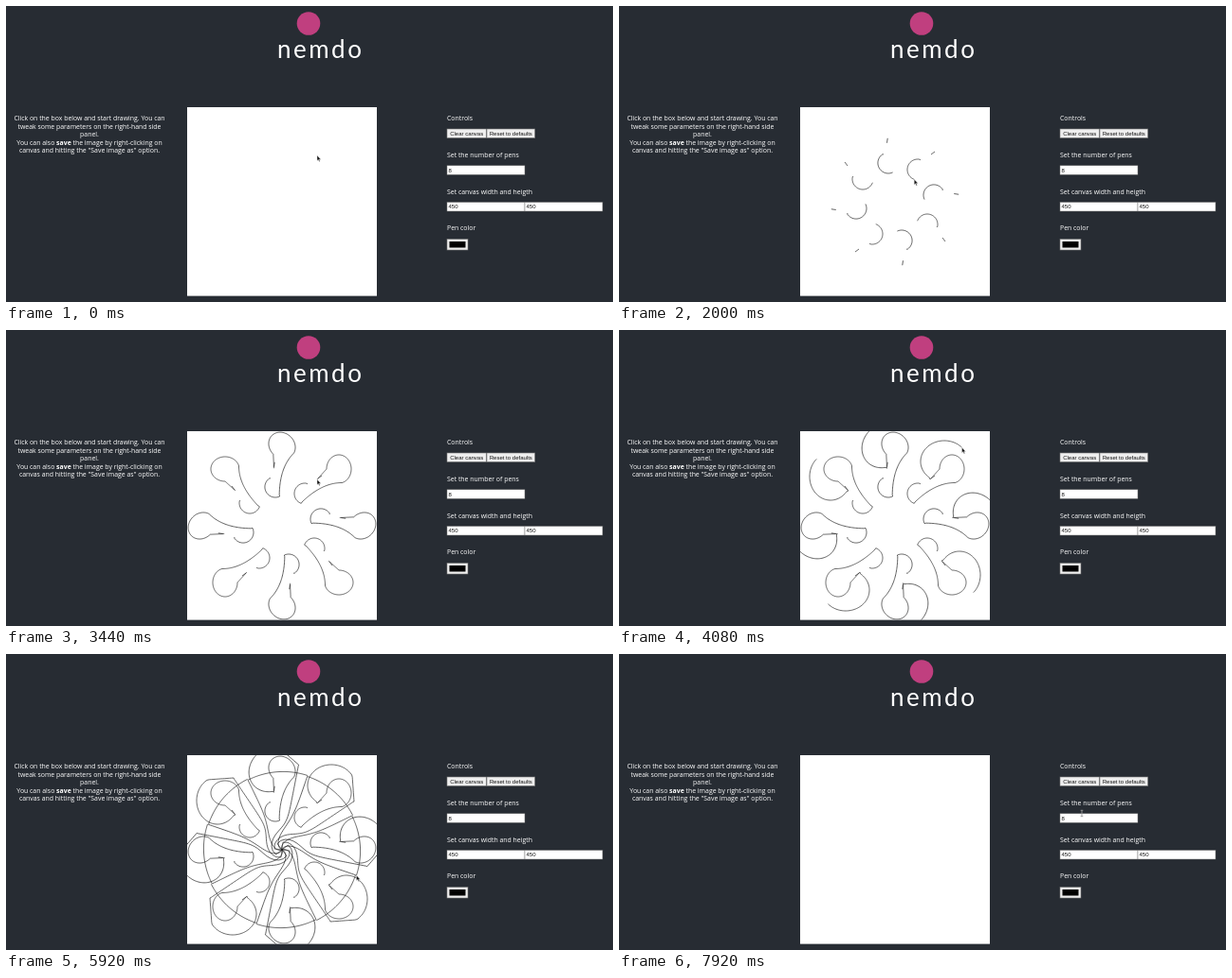
Animation of 640 by 313 pixels, one loop 8000 ms. Source, as an HTML page:

```html
<!DOCTYPE html>
<html lang="en">
<head>
<meta charset="utf-8">
<title>Mandala pens</title>
<style>
  html, body { margin: 0; height: 100%; overflow: hidden; background: #272c33; }
  svg { display: block; width: 100vw; height: 100vh; }
  .copy { font: 6.92px "Open Sans", sans-serif; fill: #fff; }
  .form { font: 6px "Liberation Sans", sans-serif; fill: #111; }
  .mid { text-anchor: middle; }
  .title { font: 26px Lato, sans-serif; letter-spacing: 2.5px; fill: #fff; }
  .box { fill: #fff; stroke: #767676; stroke-width: .5; }
  .btn { fill: #efefef; stroke: #767676; stroke-width: .6; }
  .ink { fill: none; stroke: #1a1a1a; stroke-width: .65; }
</style>
</head>
<body>
<svg viewBox="0 0 640 313">
  <defs>
    <path id="ink" class="ink"/>
    <clipPath id="sheet"><rect x="191" y="107" width="200" height="199.6"/></clipPath>
  </defs>

  <circle cx="319" cy="18.5" r="12.3" fill="#c03f7f"/>
  <text class="title" x="286" y="55">nemdo</text>

  <g class="copy mid">
    <text x="88" y="121">Click on the box below and start drawing. You can</text>
    <text x="88" y="129.6">tweak some parameters on the right-hand side</text>
    <text x="88" y="138.1">panel.</text>
    <text x="88" y="146.6">You can also <tspan font-weight="700">save</tspan> the image by right-clicking on</text>
    <text x="88" y="155.1">canvas and hitting the "Save image as" option.</text>
  </g>

  <g class="copy">
    <text x="465" y="121">Controls</text>
    <text x="465" y="159.7">Set the number of pens</text>
    <text x="465" y="198.5">Set canvas width and heigth</text>
    <text x="465" y="237.3">Pen color</text>
  </g>

  <rect id="clear" class="btn" x="465" y="130" width="41.5" height="9.5"/>
  <rect class="btn" x="507" y="130" width="50.7" height="9.5"/>
  <rect class="box" x="465" y="168.8" width="82" height="9.5"/>
  <rect class="box" x="465" y="207.5" width="82" height="9.5"/>
  <rect class="box" x="547" y="207.5" width="82" height="9.5"/>
  <rect class="btn" x="465" y="246.5" width="22" height="11.5"/>
  <rect x="467.5" y="249" width="17" height="6.5"/>
  <g class="form">
    <text class="mid" x="485.7" y="136.9">Clear canvas</text>
    <text class="mid" x="532.3" y="136.9">Reset to defaults</text>
    <text x="466.5" y="175.7">8</text>
    <text x="466.5" y="214.4">450</text>
    <text x="548.5" y="214.4">450</text>
  </g>

  <rect x="191" y="107" width="200" height="199.6" fill="#fff"/>
  <g id="pens" clip-path="url(#sheet)"></g>

  <path id="arrow" d="M0 0V5.6L1.3 4.5L2.2 6.6L3.1 6.2L2.2 4.2H3.9Z" fill="#111" stroke="#ddd" stroke-width=".5"/>
  <path id="beam" d="M-1.3 -3.2H1.3M0 -3.2V3.2M-1.3 3.2H1.3" fill="none" stroke="#999" stroke-width=".9"/>
</svg>
<script>
const LOOP = 8000, STEP = 80, PENS = 8, CX = 291, CY = 207;
const TAP = 400, DOWN = 1600, UP = 6240, CLEAR = 7360;
const $ = id => document.getElementById(id);

const linear = k => k;
const easeIn = k => k ** 12;
const easeOut = n => k => 1 - (1 - k) ** n;
const mix = (a, b, k) => a + (b - a) * k;

// Each kind of stroke maps progress k (0 to 1) to a point
const line = (x0, y0, x1, y1, ease = linear) => k => [mix(x0, x1, k), mix(y0, y1, ease(k))];
const arc = (cx, cy, rx, ry, from, to) => k => {
  const a = mix(from, to, k) * Math.PI / 180;
  return [cx + rx * Math.cos(a), cy + ry * Math.sin(a)];
};
const spiral = (r0, r1, from, to, ease = linear) => k => {
  const r = mix(r0, r1, k);
  return arc(CX, CY, r, r, from, to)(ease(k));
};

// Cursor journey: end time and stroke of each leg
const legs = [
  [1040, line(328, 158, 328, 158)],
  [1120, line(328, 158, 318, 163)],
  [DOWN, line(318, 163, 318, 163)],
  [2000, arc(315, 173, 11, 11, -75, -250)],            // hook
  [2400, line(311, 183, 354, 161.5, easeOut(2))],      // neck
  [3200, arc(351, 147, 13, 15, 75, -180)],             // small lobe
  [3440, line(338, 147, 328, 158)],
  [4120, arc(343, 139, 25, 22, 125, 330)],             // large lobe
  [4240, line(365, 128, 367, 156)],
  [4720, spiral(92, 8, -34, -173, easeIn)],            // into the centre
  [4880, spiral(8, 0, -173, -173)],
  [5280, spiral(0, 82, -116, -26, easeOut(6))],        // and out again
  [5920, spiral(82, 83, -26, 19)],                     // ring
  [UP, spiral(83, 82, 19, 24)],
  [6400, line(366, 240, 366, 240)],
  [6800, line(366, 240, 579, 146)],
  [7200, line(579, 146, 486, 134)],
  [7440, line(486, 134, 486, 134)],
  [7760, line(486, 134, 488, 168.5)],
  [LOOP, line(488, 168.5, 488, 168.5)]
];

function place(t) {
  const i = legs.findIndex(([end]) => t <= end);
  const from = i ? legs[i - 1][0] : 0;
  const [end, stroke] = legs[i];
  return stroke((t - from) / (end - from));
}

function inkPath(t) {
  if (t < TAP || t >= CLEAR) return "";
  let d = "M329 157L333 154";
  for (let s = DOWN; s <= Math.min(t, UP); s += 10)
    d += (s > DOWN ? "L" : "M") + place(s).map(v => v.toFixed(2));
  return d;
}

$("pens").innerHTML = Array.from({ length: PENS }, (_, i) =>
  `<use href="#ink" transform="rotate(${i * 360 / PENS} ${CX} ${CY})"/>`).join("");

function draw() {
  const t = Math.floor(performance.now() % LOOP / STEP) * STEP;
  const [x, y] = place(t);
  const typing = t > CLEAR && y > 166;
  const hover = x > 465 && x < 506.5 && y > 130 && y < 139.5;
  $("ink").setAttribute("d", inkPath(t));
  $("clear").style.fill = hover ? "#dedede" : "";
  for (const [id, on] of [["arrow", !typing], ["beam", typing]]) {
    $(id).setAttribute("transform", `translate(${x} ${y})`);
    $(id).style.display = on ? "" : "none";
  }
  requestAnimationFrame(draw);
}
draw();
</script>
</body>
</html>
```
